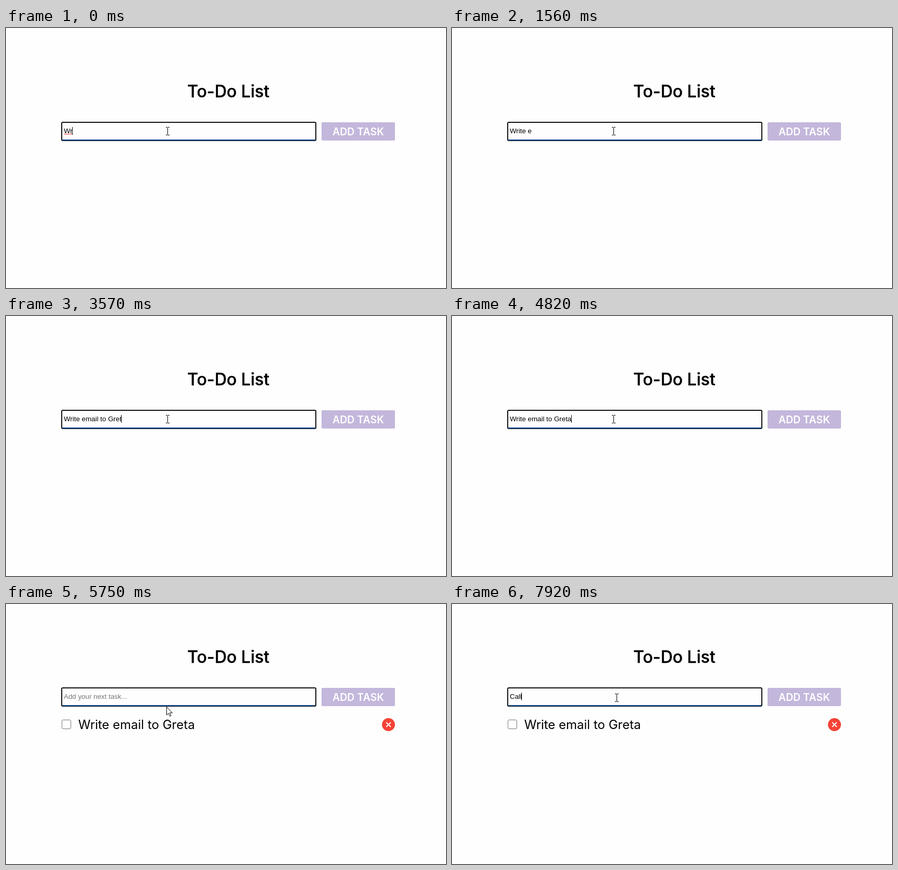
Recreate the animation shown at these times as an HTML page. Size 845x499 px, loop 8 s.

```html
<!DOCTYPE html>
<html lang="en">
<head>
<meta charset="utf-8">
<title>To-Do List</title>
<style>
  html, body { margin: 0; width: 100%; height: 100%; overflow: hidden; background: #fefefe; }
  svg { display: block; width: 845px; height: 499px; }
  text { white-space: pre; }
  .ui { font-family: Inter, sans-serif; text-anchor: middle; }
  .field { font: 13.3333px "Liberation Sans", Arial, sans-serif; }
  #task { font: 24px "Liberation Sans", Arial, sans-serif; }
  #task.loaded { font-family: Inter, sans-serif; }
</style>
</head>
<body>
<svg viewBox="0 0 845 499">
  <g id="form">
    <text class="ui" x="427" y="133" font-size="32" font-weight="500" stroke="#000" stroke-width=".4">To-Do List</text>
    <rect x="107" y="181" width="488" height="35" rx="2" fill="#fefefe" stroke="#101010" stroke-width="2"/>
    <rect x="108" y="214" width="486" height="2" fill="#1c4a94"/>
    <path id="squiggle" d="M111 204.5l2-1.5 2 1.5 2-1.5 2 1.5 2-1.5 2 1.5 2-1.5 2 1.5" fill="none" stroke="#f03030"/>
    <text id="hint" class="field" x="111" y="202" fill="#757575">Add your next task...</text>
    <text id="typed" class="field" x="111" y="202"></text>
    <rect id="caret" y="190" width="1" height="15"/>
    <rect x="606" y="181" width="141" height="35" rx="2" fill="#c3b7dc"/>
    <text class="ui" x="676.5" y="206" font-size="19.5" font-weight="600" fill="#fff">ADD TASK</text>
  </g>
  <g id="item">
    <rect x="107.5" y="222.5" width="17" height="17" rx="2" fill="#fff" stroke="#767676"/>
    <text id="task" x="138.8">Write email to Greta</text>
    <g id="remove">
      <circle cx="734.5" cy="231.5" r="12.5" fill="#f44336"/>
      <path d="M730.2 227.2l8.6 8.6m0-8.6l-8.6 8.6" stroke="#fff" stroke-width="2"/>
    </g>
  </g>
  <path id="beam" d="M0 .5h3m1 0h3M3.5 1v14M0 15.5h3m1 0h3" fill="none" stroke="#000"/>
  <path id="arrow" transform="translate(308.5 197.5)" d="M0 0V15.7L3.6 12.3 6.1 18 8.5 17 6 11.4H11Z" fill="#fff" stroke="#000"/>
</svg>
<script>
const LOOP = 8000, SUBMIT = 5080, LOADED = 5200, BEAM_BACK = 6030;
const PACE = 130, BLINK = 540;

// Bursts of typing by start time; letters follow each other at PACE.
const bursts = {
  0: "Wr", 120: "ite", 680: " ", 960: "e", 1820: "mai", 2060: "l to ",
  3030: "Gr", 3430: "eta", 6600: "C", 6860: "a", 7770: "ll"
};
const keys = Object.entries(bursts).flatMap(([from, letters]) =>
  [...letters].map((letter, i) => ({ letter, at: +from && +from + i * PACE })));

const $ = id => document.getElementById(id);
const show = (id, on) => $(id).setAttribute("visibility", on ? "visible" : "hidden");
const move = (id, x, y) => $(id).setAttribute("transform", `translate(${x} ${y})`);
const pen = document.createElement("canvas").getContext("2d");
pen.font = '13.3333px "Liberation Sans", Arial, sans-serif';

function render(t) {
  const added = t >= SUBMIT, loaded = t >= LOADED;
  const pressed = keys.filter(k => k.at <= t);
  const value = pressed.filter(k => !added || k.at > SUBMIT).map(k => k.letter).join("");
  const idle = t - pressed[pressed.length - 1].at;

  move("form", 0, added ? -20 : 0);
  $("typed").textContent = value;
  $("caret").setAttribute("x", Math.floor(111 + pen.measureText(value).width));
  show("caret", Math.floor(idle / BLINK) % 2 === 0);
  show("hint", !value);
  show("squiggle", value === "Wr");

  show("item", added);
  show("remove", loaded);
  $("task").classList.toggle("loaded", loaded);
  $("task").setAttribute("y", loaded ? 240 : 239);

  const arrowOn = added && t < BEAM_BACK;
  show("arrow", arrowOn);
  show("beam", !arrowOn);
  move("beam", added ? 313 : 307, added ? 172 : 190);
}

const start = performance.now();
function tick() {
  render((performance.now() - start) % LOOP);
  requestAnimationFrame(tick);
}
tick();
</script>
</body>
</html>
```
